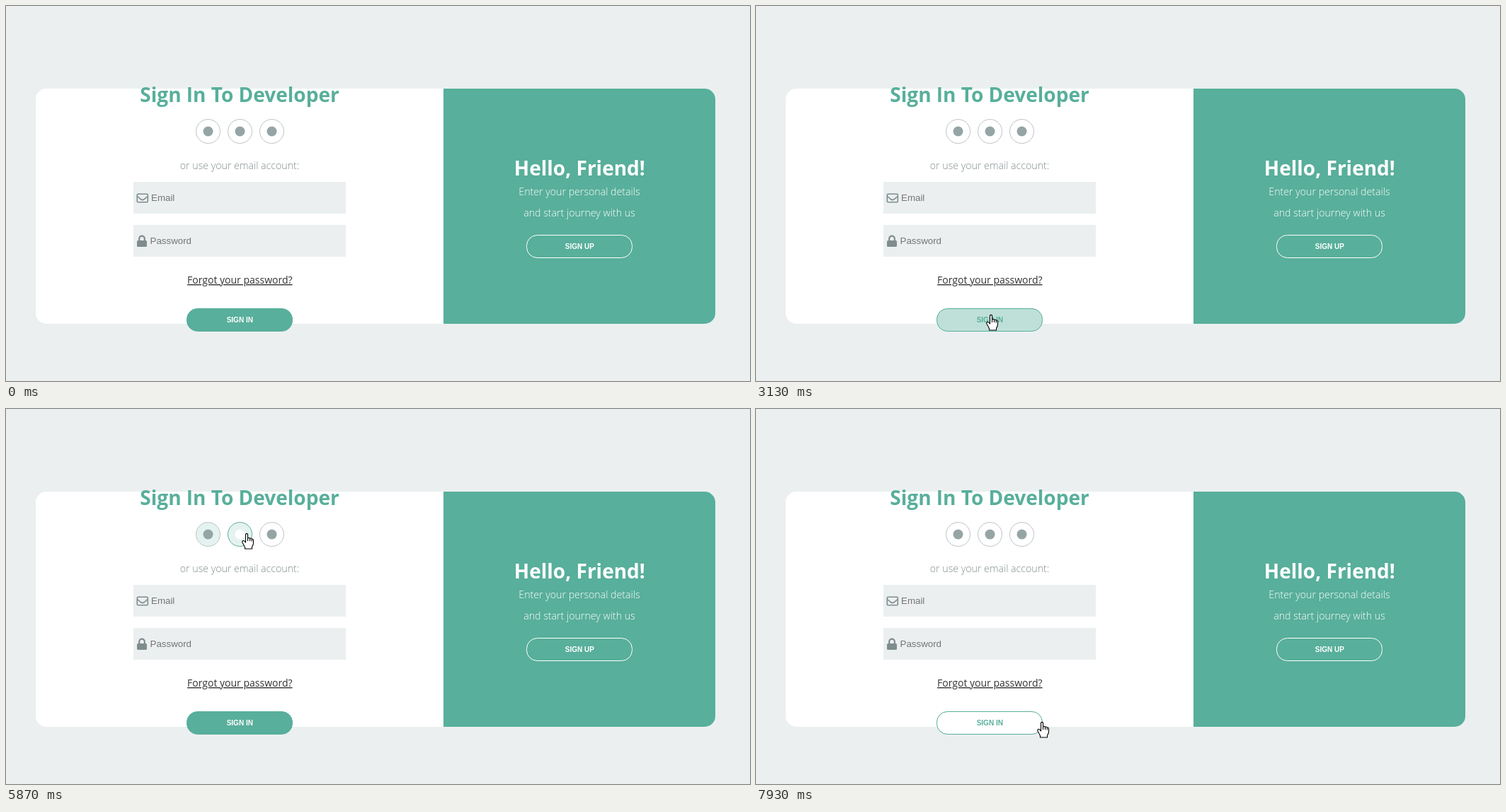
An HTML page for the animation above (8 s loop, 1051 by 531 pixels).

```html
<!DOCTYPE html>
<html lang="en">
<head>
<meta charset="utf-8">
<title>Sign in form</title>
<style>
  html, body { margin: 0; width: 100%; height: 100%; overflow: hidden; background: #ebeff0; }
  svg { display: block; }
  text { text-anchor: middle; font: 300 14.2px "Open Sans", sans-serif; }
  .head { font-weight: 700; font-size: 28px; }
  .field { text-anchor: start; font: 13.33px "Liberation Sans", Arial, sans-serif; fill: #757575; }
  .label { font: bold 10px "Liberation Sans", Arial, sans-serif; }
  .link { font-weight: 400; font-size: 14px; fill: #333; text-decoration: underline; }
</style>
</head>
<body>
<svg width="1051" height="531" viewBox="0 0 1051 531">
  <rect x="42" y="117" width="960" height="333" rx="15" fill="#fff"/>
  <path d="M618 117H987A15 15 0 0 1 1002 132V435A15 15 0 0 1 987 450H618Z" fill="#58af9b"/>

  <text class="head" x="330" y="136" fill="#58af9b">Sign In To Developer</text>
  <text x="330" y="231" fill="#7f8c8d">or use your email account:</text>
  <path d="M180 249h300v45h-300zM180 310h300v45h-300z" fill="#ebeff0"/>
  <g fill="none" stroke="#7f8c8d" stroke-width="1.6">
    <rect x="185.3" y="266.3" width="15" height="11.4" rx="1.3"/>
    <path d="M185.5 269.5L191 274Q192.8 275.2 194.6 274L200 269.5"/>
    <path d="M188.2 333V329.5a3.8 3.8 0 0 1 7.6 0V333" stroke-width="2.2"/>
  </g>
  <rect x="185" y="332" width="14" height="9" rx="1.5" fill="#7f8c8d"/>
  <text class="field" x="205" y="276">Email</text>
  <text class="field" x="203.5" y="337">Password</text>
  <text class="link" x="330.3" y="393">Forgot your password?</text>

  <g fill="#fff">
    <text class="head" x="810.3" y="240">Hello, Friend!</text>
    <text x="810" y="268">Enter your personal details</text>
    <text x="810" y="298">and start journey with us</text>
  </g>

  <g id="controls"></g>

  <g id="cursor">
    <path id="arrow" d="M0 0V16L3.7 12.6L6.4 18.6L9 17.5L6.4 11.7H11.4Z" stroke="#fff" paint-order="stroke"/>
    <g id="hand" fill="#fff" stroke="#000" stroke-width="1.1" stroke-linejoin="round">
      <path d="M-1.5 1.4Q0-.7 1.5 1.4V7Q3.3 5.6 4.5 7.4Q6 6.4 7.2 8.2Q9 7.4 9.5 9.8V14Q9.5 16.5 7.5 19V22H-2.5V20Q-3 18-6 13.2Q-6.6 10.6-5 10.2Q-3.3 10.2-1.5 13Z"/>
      <path d="M1.5 7V11M4.5 7.6V11M7.2 8.4V11.5" fill="none"/>
    </g>
  </g>
</svg>
<script>
const GREEN = "#58af9b", WHITE = "#fff";
const FRAMES = 120, LOOP = 8000, FADE = 6.5;
const $ = id => document.getElementById(id);

function add(tag, attrs) {
  const el = document.createElementNS("http://www.w3.org/2000/svg", tag);
  for (const name in attrs) el.setAttribute(name, attrs[name]);
  return $("controls").appendChild(el);
}

function button(x, y, label, rest, border) {
  const box = { x: x + .5, y: y + .5, width: 149, height: 32, rx: 15 };
  add("rect", { ...box, fill: rest });
  const tint = add("rect", { ...box, fill: WHITE });
  add("rect", { ...box, fill: "none", stroke: border });
  const text = add("text", { class: "label", x: x + 75.3, y: y + 20 });
  text.textContent = label;
  return { x, y, w: 150, h: 33, draw(hovered, level) {
    tint.setAttribute("fill-opacity", level);
    text.setAttribute("fill", hovered ? GREEN : WHITE);
  } };
}

function social(x) {
  const at = { cx: x + 17.5, cy: 177.5 };
  const tint = add("circle", { ...at, r: 17, fill: GREEN });
  const ring = add("circle", { ...at, r: 17, fill: "none" });
  const mark = add("circle", { ...at, r: 7 });
  return { x, y: 160, w: 35, h: 35, draw(hovered, level) {
    tint.setAttribute("fill-opacity", level);
    ring.setAttribute("stroke", hovered ? GREEN : "#bdc3c7");
    mark.setAttribute("fill", hovered ? WHITE : "#95a5a6");
  } };
}

const controls = [
  button(255, 428, "SIGN IN", GREEN, GREEN),
  button(735, 324, "SIGN UP", GREEN, WHITE),
  social(268), social(313), social(358)
];
const link = { x: 256, y: 378, w: 149, h: 20 };

// Pointer path: frame, x, y
const path = [
  [20, 585, 477], [24, 790, 342], [26, 720, 352], [31, 545, 366], [32, 572, 361],
  [35, 737, 350], [38, 743, 348], [42, 400, 432], [47, 332, 437], [49, 395, 436],
  [53, 745, 342], [56, 780, 344], [57, 740, 350], [59, 385, 386], [60, 346, 380],
  [63, 318, 238], [65, 288, 185], [67, 290, 182], [69, 318, 182], [72, 344, 182],
  [73, 360, 181], [76, 368, 179], [83, 284, 177], [90, 362, 176], [92, 384, 178],
  [95, 372, 200], [98, 362, 320], [102, 352, 440], [105, 430, 442], [108, 586, 444],
  [111, 395, 442], [113, 350, 442], [119, 404, 443]
];

function pointer(n) {
  if (n < path[0][0]) return null;
  const i = path.findIndex(key => key[0] >= n);
  const [n1, x1, y1] = path[i], [n0, x0, y0] = path[Math.max(i - 1, 0)];
  const k = n1 > n0 ? (n - n0) / (n1 - n0) : 1;
  return [x0 + (x1 - x0) * k, y0 + (y1 - y0) * k];
}

function over(box, p) {
  return !!p && p[0] >= box.x && p[0] <= box.x + box.w && p[1] >= box.y && p[1] <= box.y + box.h;
}

// The screen pauses for two frames after frame 35.
const paused = n => n === 36 || n === 37;
const spots = [];
for (let n = 0; n < FRAMES; n++) spots.push(pointer(paused(n) ? 35 : n));
const before = (n, steps) => {
  for (; steps; steps--) n -= n === 38 ? 3 : 1;
  return spots[Math.max(n, 0)];
};

for (const c of controls) {
  let level = 0;
  c.levels = spots.map((_, n) => {
    if (!paused(n)) level += over(c, before(n, 2)) ? 1 / FADE : -1 / FADE;
    return level = Math.min(1, Math.max(0, level));
  });
}

function draw(now) {
  const n = Math.min(FRAMES - 1, Math.floor((now % LOOP + 4) * FRAMES / LOOP));
  const p = spots[n];
  for (const c of controls) c.draw(over(c, p), c.levels[n]);
  $("cursor").style.display = p ? "" : "none";
  if (p) {
    const hand = [...controls, link].some(box => over(box, before(n, 1)));
    $("cursor").setAttribute("transform", `translate(${p.map(Math.round)})`);
    $("hand").style.display = hand ? "" : "none";
    $("arrow").style.display = hand ? "none" : "";
  }
  requestAnimationFrame(draw);
}
draw(performance.now());
</script>
</body>
</html>
```
